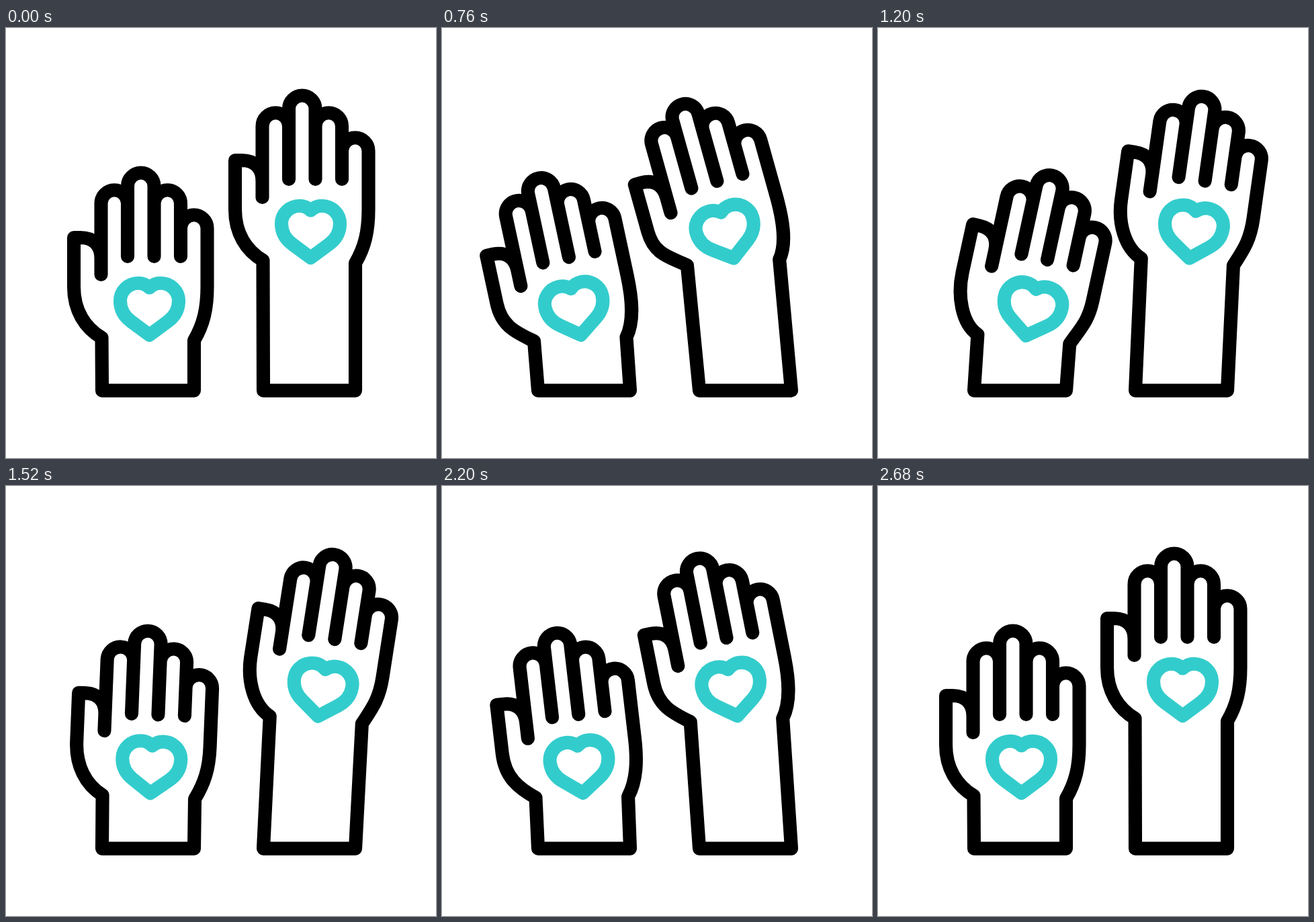
Write an HTML page that moves like this. It is 640 by 640 pixels and loops after 3000 ms.

```html
<!DOCTYPE html>
<html lang="en">
<head>
<meta charset="utf-8">
<title>Raised hands</title>
<style>
  html, body { margin: 0; width: 100%; height: 100%; overflow: hidden; background: #fff; }
  svg { display: block; width: 100%; height: 100%; }
  path { fill: none; stroke: #000; stroke-width: 20.1; stroke-linecap: round; stroke-linejoin: round; }
  .heart { stroke: #33cccc; }
</style>
</head>
<body>
<svg viewBox="0 0 640 640">
  <g id="left"><path class="hand"/><path class="heart"/></g>
  <g id="right" transform="translate(240 -115)"><path class="hand"/><path class="heart"/></g>
</svg>
<script>
const LOOP = 3000, STEP = 40;
const CENTER = 211.5, WRIST = 463;
const ARM_SHARE = 0.34; // part of the tilt taken by the forearm

const ARC = 'A19.75 19.75 0 0 1 ';
const FINGERS = `M141.5,367 L141.5,261 ${ARC}181,261 L181,340 L181,235.3 ${ARC}220.5,235.3
  L220.5,340 L220.5,261 ${ARC}260,261 L260,340 L260,298 ${ARC}299.5,298 L299.5,385`;
const THUMB = 'M141.5,343 C141.5,323 130,312 111,312 L101,312 L101,385';
const HEART = `M213.5,386.5 C208.5,382 203,379.8 197,379.8 C182,379.8 170,391.5 170,406
  C170,418.5 175.5,429 186.5,437 L213.5,457 L240.5,437 C251.5,429 257,418.5 257,406
  C257,391.5 245,379.8 230,379.8 C224,379.8 218.5,382 213.5,386.5 Z`;

// keys: [time in ms, tilt in degrees]
const hands = [
  { id: 'left', base: 539.6, keys: [[80, 0], [640, -14.6], [1260, 12.9], [1860, -13.9], [2520, 0]] },
  { id: 'right', base: 654.6, keys: [[120, 0], [725, -15.8], [1370, 12.6], [1985, -14.4], [2680, 0]] }
];

for (const h of hands) {
  const g = document.getElementById(h.id);
  h.outline = g.querySelector('.hand');
  h.heart = g.querySelector('.heart');
}

function tiltAt(keys, t) {
  if (t <= keys[0][0]) return keys[0][1];
  for (let i = 1; i < keys.length; i++) {
    const [t0, a] = keys[i - 1], [t1, b] = keys[i];
    if (t < t1) return a + (b - a) * (1 - Math.cos(Math.PI * (t - t0) / (t1 - t0))) / 2;
  }
  return keys[keys.length - 1][1];
}

function rotation(deg, cx, cy) {
  const c = Math.cos(deg * Math.PI / 180), s = Math.sin(deg * Math.PI / 180);
  return ([x, y]) => [cx + (x - cx) * c - (y - cy) * s, cy + (x - cx) * s + (y - cy) * c];
}

// Moves every "x,y" pair of a path
function mapPath(d, move) {
  return d.replace(/([\d.]+),([\d.]+)/g, (m, x, y) =>
    move([+x, +y]).map(v => v.toFixed(2)).join(','));
}

function pose(h, t) {
  const tilt = tiltAt(h.keys, t);
  const arm = rotation(tilt * ARM_SHARE, CENTER, h.base);
  const palm = rotation(tilt * (1 - ARM_SHARE), CENTER, WRIST);
  const onArm = d => mapPath(d, arm);
  const onHand = d => mapPath(d, p => arm(palm(p)));

  h.outline.setAttribute('d', [
    onHand(FINGERS), onHand('C299.5,418'), onArm('294,441 280,465'),
    `L280,${h.base} L143,${h.base}`, onArm('L142.5,461'),
    onHand(THUMB), onHand('C101,420'), onArm('117,446 142.5,461')
  ].join(' '));
  h.heart.setAttribute('d', onHand(HEART));
}

function draw(ms) {
  const t = Math.floor((ms % LOOP) / STEP) * STEP;
  hands.forEach(h => pose(h, t));
}

const start = performance.now();
function tick(now) {
  draw(Math.max(0, now - start));
  requestAnimationFrame(tick);
}
draw(0);
requestAnimationFrame(tick);
</script>
</body>
</html>
```
